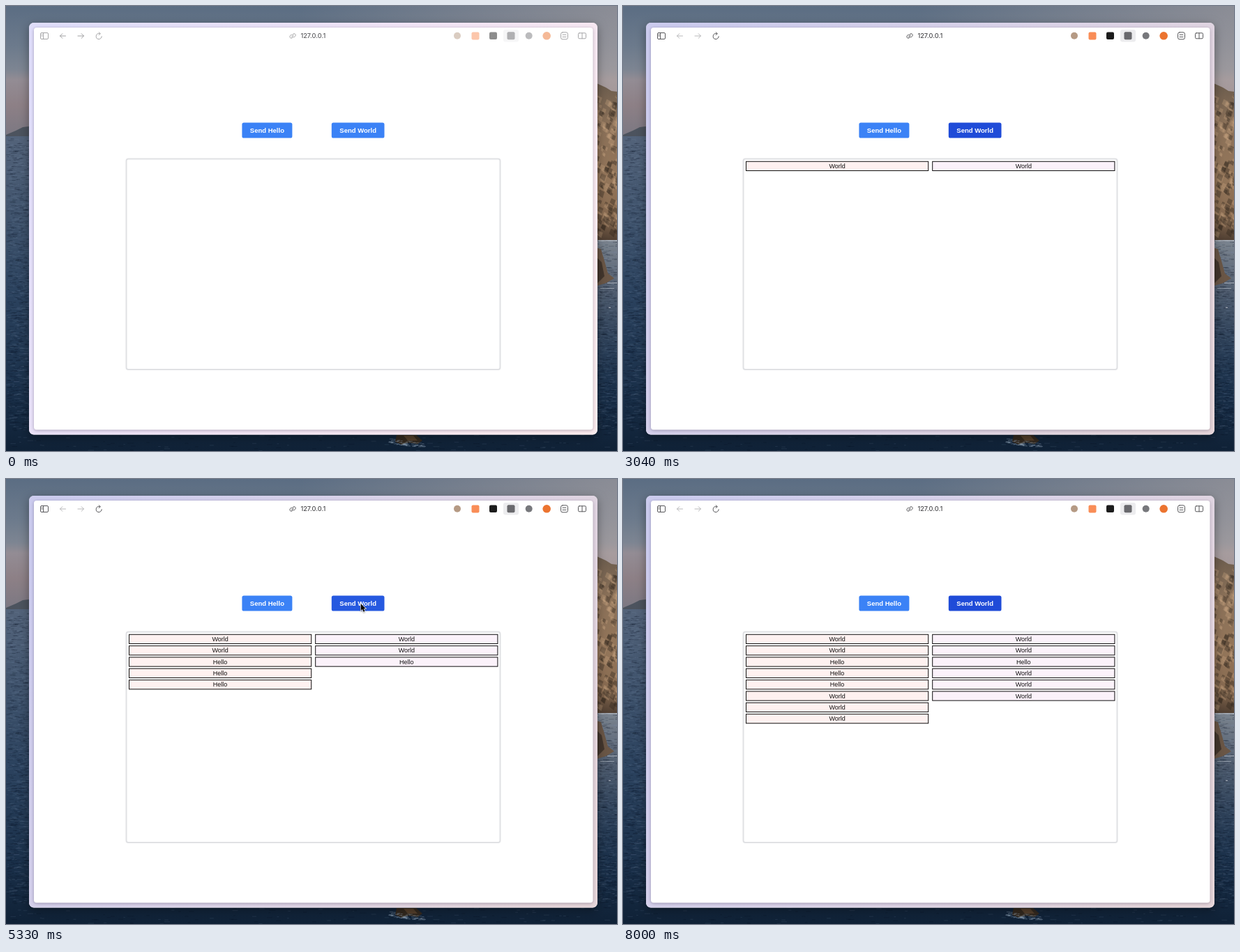
Animation, 876 px wide and 639 px high, one loop 8.04 s. Source, as an HTML page with a canvas:

```html
<!DOCTYPE html>
<html lang="en">
<head>
<meta charset="utf-8">
<title>Send Hello, Send World</title>
<style>
  html, body { margin: 0; width: 876px; height: 639px; overflow: hidden; }
  canvas { display: block; }
</style>
</head>
<body>
<canvas id="stage" width="876" height="639"></canvas>
<script>
const W = 876, H = 639, LOOP = 8040;
const ctx = document.getElementById('stage').getContext('2d');

const clamp = v => Math.max(0, Math.min(1, v));
const ease = v => v * v * (3 - 2 * v);
const ramp = (t, from, to) => ease(clamp((t - from) / (to - from)));
const mix = (a, b, k) => `rgb(${a.map((v, i) => Math.round(v + (b[i] - v) * k))})`;

function gradient(c, x0, y0, x1, y1, stops) {
  const g = c.createLinearGradient(x0, y0, x1, y1);
  stops.forEach(([p, col]) => g.addColorStop(p, col));
  return g;
}
function poly(c, pts, fill) {
  c.beginPath();
  pts.forEach(([x, y]) => c.lineTo(x, y));
  c.closePath();
  c.fillStyle = fill;
  c.fill();
}
function box(c, x, y, w, h, r, fill) {
  c.beginPath();
  c.roundRect(x, y, w, h, r);
  if (fill) { c.fillStyle = fill; c.fill(); }
}
function disc(x, y, r, fill) {
  ctx.beginPath();
  ctx.arc(x, y, r, 0, 7);
  ctx.fillStyle = fill;
  ctx.fill();
}
function label(s, x, y, font, fill) {
  ctx.font = font;
  ctx.fillStyle = fill;
  ctx.textAlign = 'center';
  ctx.textBaseline = 'alphabetic';
  ctx.fillText(s, x, y);
}
function random(seed) {
  return () => (seed = (seed * 16807) % 2147483647) / 2147483647;
}

// Coast at dusk, painted once.
function paintCoast() {
  const cv = document.createElement('canvas');
  cv.width = W; cv.height = H;
  const c = cv.getContext('2d'), rnd = random(77);

  c.fillStyle = gradient(c, 0, 0, 0, 190, [[0, '#5b6d83'], [.3, '#6c7a8c'], [.48, '#7d8592'],
    [.56, '#938c94'], [.75, '#8d8086'], [1, '#7a7782']]);
  c.fillRect(0, 0, W, 190);
  c.fillStyle = gradient(c, 420, 0, W, 0, [[0, 'rgba(186,172,168,0)'], [1, 'rgba(186,172,168,.5)']]);
  c.fillRect(0, 0, W, 190);
  poly(c, [[0, 188], [0, 185], [14, 179], [24, 174], [40, 172], [40, 188]], '#4c535e');

  c.fillStyle = gradient(c, 0, 187, 0, H, [[0, '#53637a'], [.2, '#43566f'], [.5, '#2b425e'],
    [.8, '#1a304a'], [1, '#0f2136']]);
  c.fillRect(0, 187, W, H - 187);
  c.fillStyle = gradient(c, 0, 330, 0, 560, [[0, '#7f8791'], [.3, '#566273'], [1, 'rgba(30,50,74,0)']]);
  c.fillRect(840, 330, 36, 230);

  for (let i = 0; i < 2600; i++) {
    const y = 190 + rnd() * 449, side = rnd();
    const x = y > 610 ? rnd() * W : side < .5 ? rnd() * 36 : 842 + rnd() * 34;
    c.fillStyle = rnd() < .5 ? 'rgba(5,16,32,.24)' : 'rgba(130,150,178,.14)';
    c.fillRect(x, y, 2 + rnd() * 7, 1);
  }

  poly(c, [[840, 108], [849, 112], [860, 117], [868, 122], [876, 123], [876, 336], [840, 336]],
    gradient(c, 0, 110, 0, 336, [[0, '#6b5c4d'], [.25, '#8a7058'], [.6, '#94765a'], [.85, '#876a50'],
      [1, '#503f32']]));
  for (let i = 0; i < 150; i++) {
    const x = 844 + rnd() * 32, y = 126 + rnd() * 198, s = 2 + rnd() * 5;
    poly(c, [[x, y], [x + s, y + s * .5], [x + s * .6, y + s * 1.8], [x - s * .4, y + s]],
      rnd() < .5 ? 'rgba(42,32,26,.36)' : 'rgba(205,170,132,.3)');
  }
  poly(c, [[840, 345], [853, 349], [858, 366], [863, 384], [872, 391], [860, 398], [840, 404]], '#6a5646');
  poly(c, [[848, 362], [854, 368], [858, 388], [848, 398]], '#43362d');
  c.fillStyle = 'rgba(205,212,220,.5)';
  c.fillRect(849, 336, 27, 2);
  c.fillRect(862, 397, 14, 1.5);
  c.fillRect(852, 405, 20, 1);
  c.fillRect(864, 432, 3, 2);

  poly(c, [[560, 616], [588, 616], [597, 624], [590, 629], [578, 627], [568, 630], [558, 626]], '#33291f');
  poly(c, [[570, 617], [584, 617], [590, 624], [576, 624]], '#55402c');
  for (let i = 0; i < 70; i++) {
    const x = 548 + rnd() * 50;
    c.fillStyle = 'rgba(165,185,205,.34)';
    c.fillRect(x, 621 + (x - 548) * .12 + rnd() * 7, 2 + rnd() * 4, 1);
  }
  return cv;
}
const coast = paintCoast();

function drawWindow(active) {
  ctx.save();
  ctx.shadowColor = 'rgba(0,0,0,.36)';
  ctx.shadowBlur = 14;
  ctx.shadowOffsetY = 4;
  box(ctx, 33, 24, 815, 591.5, 7, '#ddd');
  ctx.restore();
  box(ctx, 33, 24, 815, 591.5, 7, gradient(ctx, 33, 100, 848, 540, [
    [0, mix([223, 221, 250], [203, 203, 238], active)],
    [.5, mix([241, 228, 245], [219, 211, 232], active)],
    [1, mix([252, 235, 237], [229, 213, 217], active)]]));
  ctx.save();
  ctx.shadowColor = 'rgba(40,30,60,.35)';
  ctx.shadowBlur = 4;
  ctx.shadowOffsetY = 1;
  box(ctx, 40, 31, 801.5, 577.5, 4, '#fff');
  ctx.restore();
}

function line(d) { ctx.stroke(new Path2D(d)); }

function drawToolbar(active) {
  const ink = mix([166, 166, 168], [88, 88, 91], active);
  ctx.lineWidth = 1;
  ctx.lineCap = ctx.lineJoin = 'round';

  ctx.strokeStyle = ink;
  box(ctx, 49.5, 38.5, 11, 9, 1.5);
  ctx.stroke();
  line('M53.5 38.5V47.5M51 41H52M51 43H52');
  ctx.strokeStyle = mix([160, 160, 162], [184, 184, 186], active);
  line('M85.5 43H77.5M80.8 39.7L77.5 43L80.8 46.3');
  line('M103 43H111.5M108.2 39.7L111.5 43L108.2 46.3');

  ctx.strokeStyle = ink;
  line('M137.2 43.7A4 4 0 1 1 133.4 39.6L135 39.6M133.2 37.8L135.2 39.7L133.2 41.6');
  line('M409.8 42.2L411.6 40.3A2.1 2.1 0 0 1 414.6 43.3L412.7 45.2M412.2 43.8L410.3 45.8A2.1 2.1 0 0 1 407.4 42.8L409.2 40.9M409.6 44.6L412.2 41.7');
  box(ctx, 795.5, 37.8, 10, 10, 2.5);
  ctx.stroke();
  line('M798 41.2H803M798 44.4H803');
  box(ctx, 820.5, 38.8, 11, 8, 1.5);
  ctx.stroke();
  line('M826 38.8V46.8');

  label('127.0.0.1', 440.3, 46.2, '500 9.2px Inter, sans-serif', mix([92, 92, 95], [75, 75, 78], active));

  box(ctx, 713, 34, 22, 17.5, 3, mix([246, 246, 247], [236, 236, 238], active));
  ctx.globalAlpha = .5 + .5 * active;
  disc(647, 42.8, 5, '#b59a84');
  box(ctx, 667.5, 37.5, 11, 11, 2, '#f98d57');
  box(ctx, 693, 37.5, 11, 10.5, 2, '#1c1c1c');
  box(ctx, 718.5, 37.3, 11, 11, 2, '#69696d');
  disc(749.7, 42.8, 5, '#77787c');
  disc(775.2, 42.8, 5.8, '#ec7430');
  ctx.globalAlpha = 1;
}

const BLUE = [59, 130, 246], NAVY = [31, 75, 216];
function button(x, w, text, hover) {
  box(ctx, x, 167.5, w, 22, 2.6, mix(BLUE, NAVY, hover));
  label(text, x + w / 2, 181.7, 'bold 9.5px "Liberation Sans", Arial, sans-serif', '#fff');
}

// Each click: time, word, and whether the second column receives it too.
const clicks = [
  [2960, 'World', true], [3450, 'World', true], [4040, 'Hello', true],
  [4260, 'Hello', false], [4890, 'Hello', false], [5500, 'World', true],
  [5960, 'World', true], [6480, 'World', true]
];
function row(x, i, word, fill) {
  const y = 222.8 + 16.33 * i, w = 262.2;
  ctx.fillStyle = fill;
  ctx.fillRect(x, y, w, 14.2);
  ctx.strokeStyle = '#111';
  ctx.lineWidth = 1;
  ctx.strokeRect(x + .5, y + .5, w - 1, 13.2);
  label(word, x + w / 2, y + 10.3, '9px "Liberation Sans", Arial, sans-serif', '#111');
}
function drawMessages(t) {
  box(ctx, 172.5, 219.5, 536, 302.5, 3);
  ctx.strokeStyle = '#e0e1e4';
  ctx.lineWidth = 2;
  ctx.stroke();
  ctx.lineJoin = 'miter';
  let left = 0, right = 0;
  for (const [at, word, both] of clicks) {
    if (t < at) break;
    row(176, left++, word, '#fef1f0');
    if (both) row(443.2, right++, word, '#fbf2fa');
  }
}

const path = [
  [480, 448, -16], [1260, 502, 147], [1700, 520, 172], [3740, 520, 172],
  [4060, 394, 174], [5000, 394, 174], [5420, 523, 179], [LOOP, 523, 179]
];
function drawCursor(t) {
  if (t < 480) return;
  const shown = t < 3740 ? 1 - ramp(t, 2440, 2560) : 1 - ramp(t, 6930, 7040);
  if (!shown) return;
  const i = path.findIndex(p => p[0] > t);
  const [t0, x0, y0] = path[i - 1], [t1, x1, y1] = path[i];
  const k = ramp(t, t0, t1);
  ctx.save();
  ctx.globalAlpha = shown;
  ctx.translate(x0 + (x1 - x0) * k, y0 + (y1 - y0) * k);
  const arrow = new Path2D('M.6 .6V10.6L2.9 8.5L4.6 12.4L6.4 11.6L4.7 7.8H7.9Z');
  ctx.shadowColor = 'rgba(0,0,0,.35)';
  ctx.shadowBlur = 2;
  ctx.shadowOffsetY = 1;
  ctx.lineJoin = 'round';
  ctx.lineWidth = 1.5;
  ctx.strokeStyle = '#fff';
  ctx.stroke(arrow);
  ctx.shadowColor = 'transparent';
  ctx.fillStyle = '#000';
  ctx.fill(arrow);
  ctx.restore();
}

function draw(t) {
  const active = ramp(t, 1560, 1760);
  const onWorld = t < 5000 ? ramp(t, 2110, 2260) - ramp(t, 3820, 3970) : ramp(t, 5230, 5380);
  const onHello = ramp(t, 3930, 4080) - ramp(t, 5080, 5230);
  ctx.drawImage(coast, 0, 0);
  drawWindow(active);
  drawToolbar(active);
  button(338.4, 72, 'Send Hello', onHello);
  button(466.8, 75.7, 'Send World', onWorld);
  drawMessages(t);
  drawCursor(t);
}

const start = performance.now();
function tick() {
  draw((performance.now() - start) % LOOP);
  requestAnimationFrame(tick);
}
tick();
</script>
</body>
</html>
```
